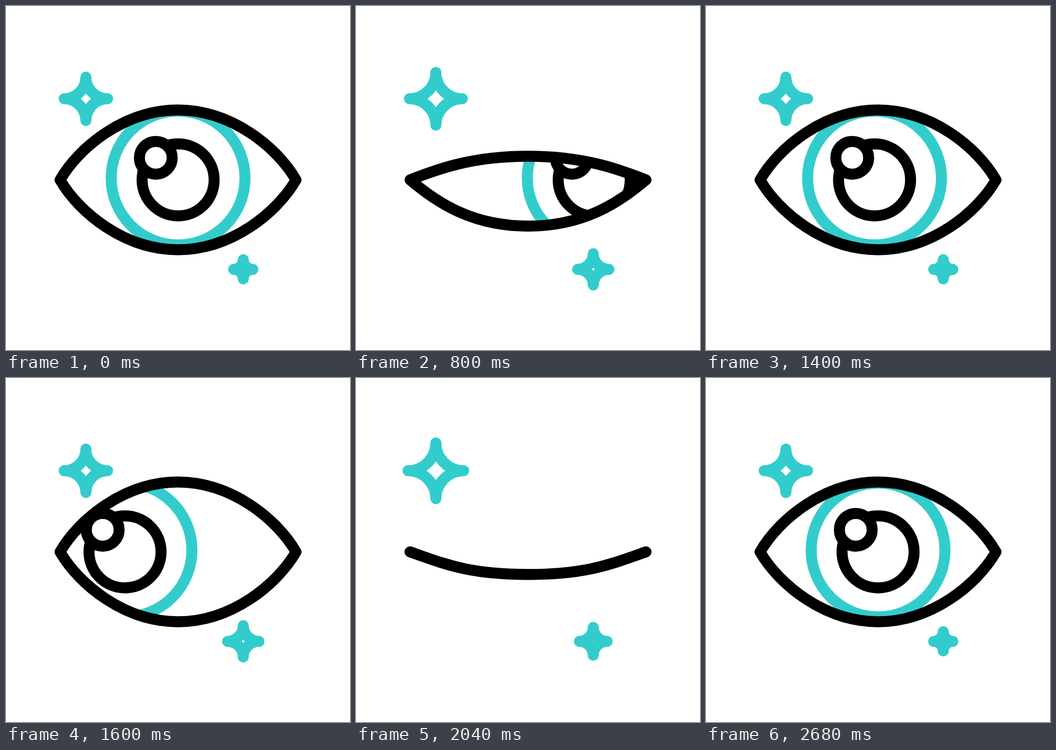
Write an HTML page that moves like this. It is 640 px wide and 640 px high and loops after 3000 ms.

```html
<!DOCTYPE html>
<html lang="en">
<head>
<meta charset="utf-8">
<title>Blinking eye</title>
<style>
  html, body { margin: 0; width: 100%; height: 100%; overflow: hidden; background: #fff; }
  svg { display: block; width: 100%; height: 100%; }
  .line { fill: none; stroke: #000; stroke-width: 20.5; stroke-linecap: round; stroke-linejoin: round; }
  .teal { stroke: #33cccc; }
  .solid { fill: #fff; }
</style>
</head>
<body>
<svg viewBox="0 0 640 640">
  <defs><clipPath id="opening"><path id="hole"/></clipPath></defs>
  <g clip-path="url(#opening)">
    <g id="iris">
      <circle class="line teal" cx="320.2" cy="320" r="124.5"/>
      <circle class="line" cx="320.2" cy="323.5" r="67"/>
      <circle class="line solid" cx="278.7" cy="282.4" r="30.5"/>
    </g>
  </g>
  <path id="lids" class="line"/>
  <path id="starA" class="line teal" transform="translate(148.6 172.6)"/>
  <path id="starB" class="line teal" transform="translate(441.4 489.9)"/>
</svg>
<script>
const LOOP = 3000, STEP = 40;
const el = id => document.getElementById(id);
const mix = (a, b, k) => a + (b - a) * k;

// Eased value at time t from [time, value] keys
function track(keys, t) {
  if (t <= keys[0][0]) return keys[0][1];
  for (let i = 1; i < keys.length; i++) {
    const [t0, a] = keys[i - 1], [t1, b] = keys[i];
    if (t < t1) {
      const x = (t - t0) / (t1 - t0);
      return mix(a, b, x * x * (3 - 2 * x));
    }
  }
  return keys[keys.length - 1][1];
}

const pulses = (low, high, ...starts) =>
  starts.flatMap(s => [[s, low], [s + 400, high], [s + 800, low]]);

const look = [[200, 0], [705, 123], [1040, 123], [1735, -123], [1960, -123], [2690, 0]];
const blink = [[600, 0], [1000, 1], [1400, 0], [1680, 0], [2040, 1], [2440, 0]];
const sizeA = pulses(40.4, 58, 600, 1800);
const sizeB = pulses(17.8, 40.5, 200, 1400);

// Four-pointed star with quarter-circle sides
function star(r) {
  const arc = (x, y) => `A${r} ${r} 0 0 0 ${x} ${y}`;
  return `M0 ${-r}${arc(r, 0)}${arc(0, r)}${arc(-r, 0)}${arc(0, -r)}Z`;
}

// k = 0 wide open, k = 1 shut
function eye(k) {
  const left = 100.6, right = 539.5, mid = 320, y = 323.5;
  const x1 = mix(35, 63, k), x2 = mix(120, 109, k);
  const lid = side => [y + mix(side * 60.7, 22, k), y + mix(side * 130, 42, k)];
  const [t1, t2] = lid(-1), [b1, b2] = lid(1);
  return `M${left} ${y}C${left + x1} ${t1} ${left + x2} ${t2} ${mid} ${t2}` +
    `C${right - x2} ${t2} ${right - x1} ${t1} ${right} ${y}` +
    `C${right - x1} ${b1} ${right - x2} ${b2} ${mid} ${b2}` +
    `C${left + x2} ${b2} ${left + x1} ${b1} ${left} ${y}Z`;
}

function draw(now) {
  const t = Math.floor((now % LOOP) / STEP) * STEP;
  const shape = eye(track(blink, t));
  el("lids").setAttribute("d", shape);
  el("hole").setAttribute("d", shape);
  el("iris").setAttribute("transform", `translate(${track(look, t)} 0)`);
  el("starA").setAttribute("d", star(track(sizeA, t)));
  el("starB").setAttribute("d", star(track(sizeB, t)));
}

let start;
function tick(now) {
  start ??= now;
  draw(now - start);
  requestAnimationFrame(tick);
}
draw(0);
requestAnimationFrame(tick);
</script>
</body>
</html>
```
